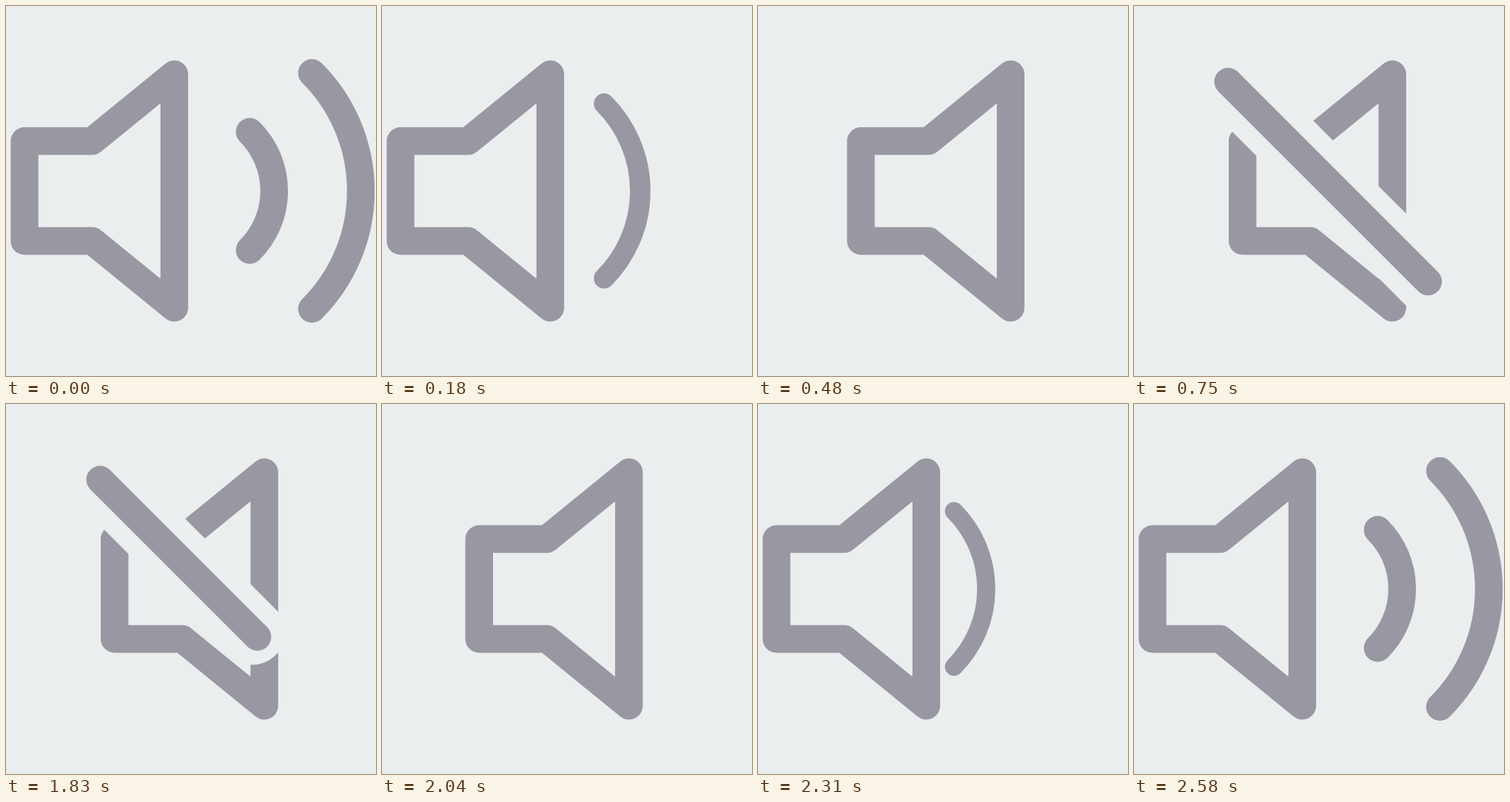
An HTML page with a canvas that plays this animation: 500x500 px, repeating every 2730 ms.

```html
<!DOCTYPE html>
<html lang="en">
<head>
<meta charset="utf-8">
<title>Mute toggle</title>
<style>
  html, body { margin: 0; height: 100%; overflow: hidden; background: #eaeeef; }
  canvas { display: block; width: 500px; height: 500px; }
</style>
</head>
<body>
<canvas id="stage" width="500" height="500"></canvas>
<script>
const ctx = document.getElementById('stage').getContext('2d');
const LOOP = 2730, STEP = 30;
const BG = '#eaeeef', INK = '#9998a2', LINE = 37.4;

// Eased 0..1 progress, fast at first and slowing down
const ramp = (t, start, length) =>
  Math.sin(Math.PI / 2 * Math.min(1, Math.max(0, (t - start) / length)));
const mix = (a, b, k) => a + (b - a) * k;

function stroke(points, color, width, closed) {
  ctx.beginPath();
  points.forEach(([x, y]) => ctx.lineTo(x, y));
  if (closed) ctx.closePath();
  ctx.strokeStyle = color;
  ctx.lineWidth = width;
  ctx.stroke();
}

// Quarter arc that grows from half size as it leaves the speaker
function wave(radius, fromX, toX, k) {
  ctx.save();
  ctx.translate(mix(fromX, toX, k), 249.9);
  ctx.scale(mix(.5, 1, k), mix(.5, 1, k));
  ctx.beginPath();
  ctx.arc(-radius, 0, radius, -Math.PI / 4, Math.PI / 4);
  ctx.strokeStyle = INK;
  ctx.lineWidth = LINE;
  ctx.stroke();
  ctx.restore();
}

function speaker(dx) {
  const half = [[25, 182.5], [116.5, 182.5], [227.4, 92.2]];
  const mirrored = half.map(([x, y]) => [x, 500 - y]).reverse();
  stroke([...half, ...mirrored].map(([x, y]) => [x + dx, y]), INK, LINE, true);
}

// Diagonal from x = from towards x = 397.4, drawn up to fraction k
function diagonal(from, k, color, width) {
  const to = mix(from, 397.4, k);
  stroke([[from, from - 25], [to, to - 25]], color, width);
}

function draw(t) {
  const near = 1 - ramp(t, 0, 250) + ramp(t, 2310, 270);
  const far = 1 - ramp(t, 60, 345) + ramp(t, 2248, 300);
  const dx = 121.7 * (ramp(t, 276, 264) - ramp(t, 2019, 260));
  const slash = ramp(t, 540, 210) - ramp(t, 1800, 219);

  ctx.fillStyle = BG;
  ctx.fillRect(0, 0, 500, 500);

  // Waves show only to the right of the speaker's front
  ctx.save();
  ctx.beginPath();
  ctx.rect(227.4 + dx, 0, 500, 500);
  ctx.clip();
  wave(113, 220, 362.4, near);
  wave(225.4, 228.3, 479.5, far);
  ctx.restore();

  speaker(dx);
  if (slash > 0.001) {
    diagonal(97, slash, BG, 88);
    diagonal(127.2, slash, INK, LINE);
  }
}

ctx.lineCap = ctx.lineJoin = 'round';
const begin = performance.now();
function tick() {
  const t = (performance.now() - begin) % LOOP;
  draw(Math.floor(t / STEP) * STEP);
  requestAnimationFrame(tick);
}
tick();
</script>
</body>
</html>
```
